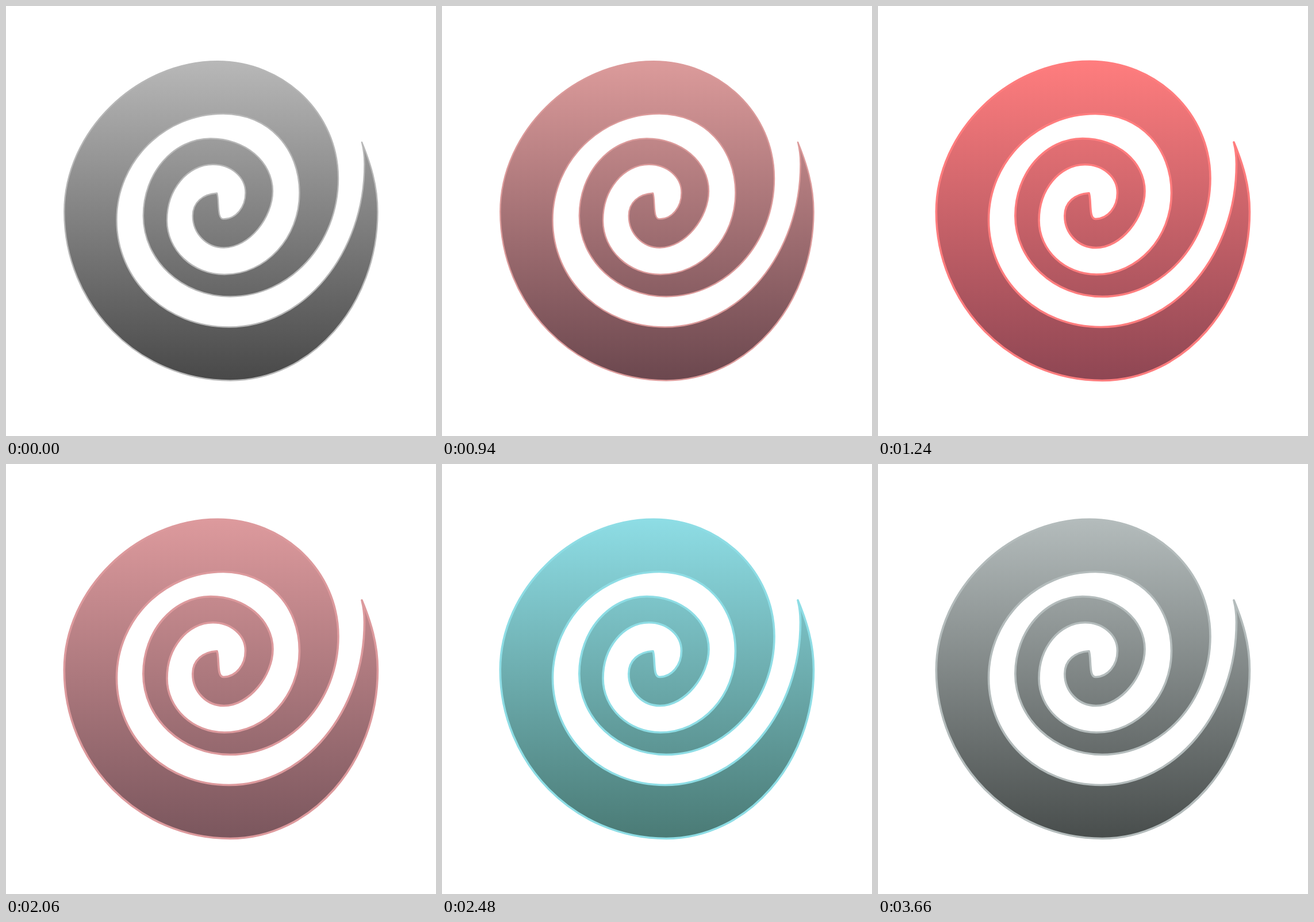
An HTML page that plays this animation: 748 px wide and 748 px high, repeating every 3.72 s.

```html
<!DOCTYPE html>
<html lang="en">
<head>
<meta charset="utf-8">
<title>Spiral</title>
<style>
  @property --top { syntax: "<color>"; inherits: true; initial-value: #b8b8b8; }
  @property --low { syntax: "<color>"; inherits: true; initial-value: #484848; }

  html, body { margin: 0; width: 100%; height: 100%; overflow: hidden; background: #fff; }

  svg {
    display: block;
    width: 100%;
    height: 100%;
    animation: tint 3720ms linear infinite;
  }
  .top { stop-color: var(--top); }
  .low { stop-color: var(--low); }
  .spiral {
    fill: url(#shade);
    stroke: var(--top);
    stroke-linejoin: round;
    animation: edge 3720ms step-end infinite;
  }

  /* grey, red, teal and back, in 60 ms steps */
  @keyframes tint {
    0% { --top: #b8b8b8; --low: #484848; animation-timing-function: step-end; }
    18.817% { --top: #b8b8b8; --low: #484848; animation-timing-function: steps(10, jump-start); }
    34.946% { --top: #ff7d7e; --low: #8e4653; animation-timing-function: step-end; }
    52.15% { --top: #ff7d7e; --low: #8e4653; animation-timing-function: steps(3, jump-start); }
    56.989% { --top: #dd9a9d; --low: #7a565d; animation-timing-function: step-end; }
    58.602% { --top: #c6adb1; --low: #6c6064; animation-timing-function: steps(5, jump-end); }
    66.666% { --top: #8edde5; --low: #4a7a75; animation-timing-function: step-end; }
    85.483% { --top: #92d9e0; --low: #4a7570; animation-timing-function: steps(9, jump-end); }
    100% { --top: #b8b8b8; --low: #484848; }
  }
  @keyframes edge {
    0% { stroke-width: 2.4px; }
    33.333%, 100% { stroke-width: 3.6px; }
  }
</style>
</head>
<body>
<svg viewBox="0 0 748 748">
  <defs>
    <linearGradient id="shade" gradientUnits="userSpaceOnUse" x1="0" y1="95" x2="0" y2="653">
      <stop class="top" offset="0"/>
      <stop class="low" offset="1"/>
    </linearGradient>
  </defs>
  <path class="spiral" d="
    M619 237
    C634 273 646.5 312 646.5 358
    C646.5 520 531 651.5 390 651.5
    C230 651.5 101.3 520 101.3 358
    C101.3 219 227 96.3 368 96.3
    C484 96.3 578 187 578 300
    C578 413 494 505.5 390 505.5
    C306 505.5 238.8 442 238.8 365
    C238.8 291 291 230.5 356 230.5
    C416 230.5 464 271 464 322
    C464 368 423 420.5 379 420.5
    C349 420.5 324.8 396 324.8 365
    C324.8 342 342 327 367 325.5
    C371.5 338 366 372 379 370.5
    C400 370 416.5 350 416.5 325
    C416.5 297 391 275.8 360 275.8
    C316 275.8 280 319 280 373
    C280 425 325 467 380 467
    C452 467 510.5 403 510.5 325
    C510.5 248 457 187.5 378 187.5
    C276 187.5 192.5 270 192.5 372
    C192.5 477 278 558.5 388 558.5
    C518 558.5 623.5 431 623.5 275
    C623.5 262 622 249 619 237
    Z"/>
</svg>
</body>
</html>
```
